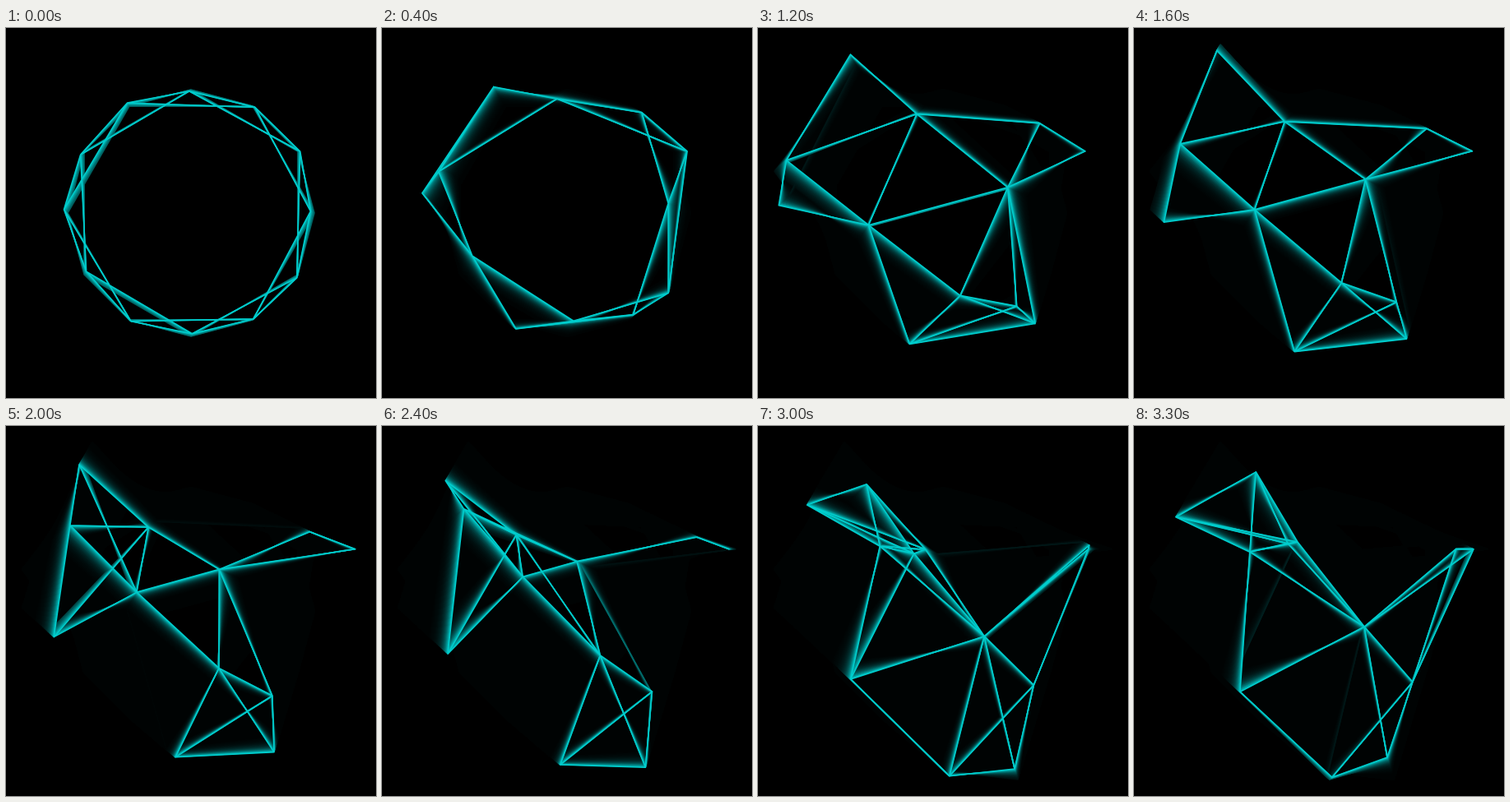
Animation of 450 by 450 pixels, one loop 3.4 s. Source, as an HTML page with a canvas:

```html
<!DOCTYPE html>
<html lang="en">
<head>
<meta charset="utf-8">
<title>Drifting net</title>
<style>
  html, body { margin: 0; width: 100%; height: 100%; overflow: hidden; background: #000; }
  canvas { display: block; width: 450px; height: 450px; }
</style>
</head>
<body>
<canvas id="stage" width="450" height="450"></canvas>
<script>
const LOOP = 3400, STEP = 100;
const TICKS = 6;            // simulation ticks per visible step
const LEAD = 5;             // ticks already run when the loop opens
const REACH = 180;          // nodes closer than this are joined
const LOW = 20, HIGH = 430; // walls

// Velocity of each node in pixels per step, clockwise from the right.
const drift = [
  [-5.56, -2.43], [-1.39, 4.64], [1.15, -1.29], [1.63, -3.87],
  [2.69, 2.30], [3.07, -4.70], [-5.42, -5.00], [-5.44, 5.12],
  [-2.93, -4.90], [-2.49, 2.31], [3.34, 1.62], [3.36, -0.01]
];
const ctx = document.getElementById('stage').getContext('2d', { willReadFrequently: true });

const bounce = v => v < LOW ? 2 * LOW - v : v > HIGH ? 2 * HIGH - v : v;

function nodesAt(t) {
  return drift.map(([vx, vy], i) => {
    const a = i * Math.PI / 6;
    return [bounce(225 + 150 * Math.cos(a) + vx * t),
            bounce(225 + 150 * Math.sin(a) + vy * t)];
  });
}

function drawTick(n) {
  ctx.fillStyle = n ? 'rgba(0,0,0,0.15)' : '#000';
  ctx.fillRect(0, 0, 450, 450);
  const nodes = nodesAt(n / TICKS);
  ctx.strokeStyle = '#00cdcd';
  ctx.lineWidth = 1.6;
  ctx.lineCap = 'round';
  ctx.beginPath();
  nodes.forEach((p, i) => {
    for (const q of nodes.slice(i + 1)) {
      if (Math.hypot(p[0] - q[0], p[1] - q[1]) < REACH) {
        ctx.moveTo(...p);
        ctx.lineTo(...q);
      }
    }
  });
  ctx.stroke();
}

let tick = -1;
function show(ms) {
  const goal = LEAD + TICKS * Math.floor((ms % LOOP) / STEP);
  if (goal < tick) tick = -1; // replay the trails from the start
  while (tick < goal) drawTick(++tick);
}

const start = performance.now();
function frame() {
  show(performance.now() - start);
  requestAnimationFrame(frame);
}
frame();
</script>
</body>
</html>
```
